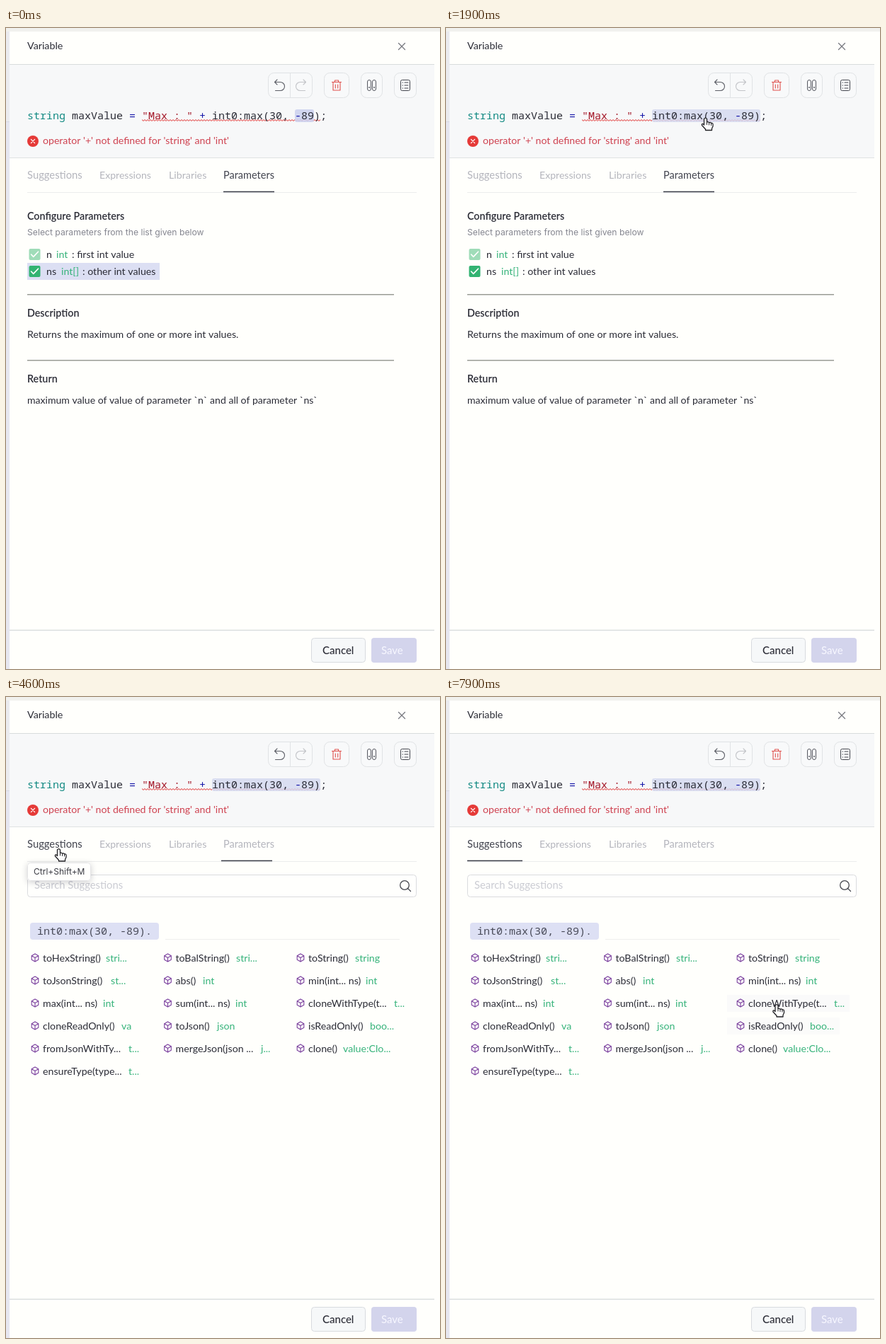
Animation, 613 px wide and 906 px high, one loop 8 s. Source, as an HTML page with a canvas:

```html
<!DOCTYPE html>
<html lang="en">
<head>
<meta charset="utf-8">
<title>Variable</title>
<style>
html, body { margin: 0; width: 100%; height: 100%; overflow: hidden; background: #fffffc; }
canvas { display: block; width: 613px; height: 906px; }
</style>
</head>
<body>
<canvas id="stage"></canvas>
<script>
const W = 613, H = 906, LOOP = 8000;
const stage = document.getElementById('stage');
const dpr = window.devicePixelRatio || 1;
stage.width = W * dpr;
stage.height = H * dpr;
const c = stage.getContext('2d');

const UI = 'Lato, "Open Sans", sans-serif';
const SMALL = 'Inter, sans-serif';
const MONO = '"Noto Sans Mono", "DejaVu Sans Mono", monospace';
const INK = '#2b2c36', GREEN = '#36b37a', GREY = '#b4b5bd', DARK = '#42444f';

function text(s, x, y, color = INK, size = 14.2, family = UI, weight = 400) {
  c.font = `${weight} ${size}px ${family}`;
  c.fillStyle = color;
  c.fillText(s, x, y);
}

function box(x, y, w, h, r, fill, line) {
  c.beginPath();
  c.roundRect(x, y, w, h, r);
  if (fill) { c.fillStyle = fill; c.fill(); }
  if (line) { c.strokeStyle = line; c.lineWidth = 1; c.stroke(); }
}

function rect(x, y, w, h, fill) {
  c.fillStyle = fill;
  c.fillRect(x, y, w, h);
}

// Strokes an SVG path around a local origin
function icon(x, y, d, color, width = 1.1, fill) {
  const p = new Path2D(d);
  c.save();
  c.translate(x, y);
  c.lineWidth = width;
  c.lineCap = c.lineJoin = 'round';
  if (fill) { c.fillStyle = fill; c.fill(p); }
  if (color) { c.strokeStyle = color; c.stroke(p); }
  c.restore();
}

const UNDO = 'M-3 -8L-6.5 -4.5L-3 -1M-6.5 -4.5H1.5A6 6 0 0 1 1.5 7.5H-5.5';
const REDO = 'M3 -8L6.5 -4.5L3 -1M6.5 -4.5H-1.5A6 6 0 0 0 -1.5 7.5H5.5';
const TRASH = 'M-6.5 -4.5H6.5M-2.5 -4.5V-7H2.5V-4.5M-5 -4.5V7H5V-4.5M-1.7 -1V4M1.7 -1V4';
const CUBE = 'M0 -5.6L4.8 -2.8V2.8L0 5.6L-4.8 2.8V-2.8ZM-4.8 -2.8L0 0L4.8 -2.8M0 0V5.6';
const ARROW = 'M0 0V16L3.8 12.6L6.4 18.6L9 17.4L6.5 11.7H11.6Z';
const HAND = 'M-2 1.5Q0 -1.2 2 1.5V6Q4 5 5 6.8Q7 5.8 8 7.5Q10.6 7 10.5 9.5V12L9 15V17.5H0V16L-5 10.5Q-5.6 8 -3.6 8.6L-2 10Z';

function drawFrame() {
  rect(0, 0, W, H, '#fffffc');
  rect(0, 0, W, 5, '#f1f1ee');
  rect(0, 5, 5, 127, '#ebebef');
  rect(0, 132, 5, H - 132, '#e6e6f0');
  rect(0, 132, 5, 1, '#d9d9e4');
  text('Variable', 30, 30, INK, 14.3);
  icon(559, 26, 'M-4.5 -4.5L4.5 4.5M4.5 -4.5L-4.5 4.5', '#77787f', 1.3);
  rect(5, 52, 600, 131, '#f7f8f9');
  rect(5, 51, 600, 1, '#d8dcdc');
  rect(5, 183, 600, 1, '#dfe2e3');

  for (const [x, w] of [[370.5, 62], [449.5, 35], [501.5, 30], [548.5, 31]]) {
    box(x, 63.5, w, 35, 8, '#f8f9fa', '#e0e3e5');
  }
  rect(401, 64, 1, 35, '#e0e3e5');
  icon(386, 81, UNDO, '#5c5e66');
  icon(417, 81, REDO, '#c2c4c8');
  icon(467, 81, TRASH, '#e0504c');
  for (const x of [510.5, 517.5]) {
    box(x, 73.5, 5, 15, 2.5, null, '#55575f');
    box(x + 1.5, 83, 2, 2, 1, '#55575f');
  }
  box(557.5, 73.5, 13, 15, 2, null, '#44464e');
  for (const y of [77, 81, 85]) {
    icon(564, y, 'M-4 0H-3.5M-1 0H4', '#44464e');
  }

  rect(5, 850.5, 600, 1.5, '#dcdfe0');
  box(431.5, 862.5, 76, 34, 4, '#f6f8f9', '#d8dbdf');
  text('Cancel', 447, 885, INK, 15, UI, 500);
  box(516, 862, 64, 35, 4, '#d3d4ec');
  text('Save', 530, 885, '#f7f7ff', 15);
}

const CODE = [
  ['string', 0, '#128a83'], ['maxValue', 7, INK], ['=', 16, '#1414a8'],
  ['"Max : "', 18, '#a31526'], ['+', 27, '#1414a8'], ['int0:max(30,', 29, INK],
  ['-', 42, '#1414a8'], ['89);', 43, INK]
];

function drawCode(hover, selected) {
  c.beginPath();
  for (let x = 192; x <= 444; x += 2) c.lineTo(x, 130.5 + (x % 4 ? 0.9 : -0.9));
  c.strokeStyle = '#e0302f';
  c.lineWidth = 1;
  c.stroke();
  if (selected) box(291, 115, 153, 18, 3, 'rgba(213,217,240,.84)');
  else {
    if (hover) box(291, 115, 153, 18, 3, '#e5e8ed');
    box(408, 115, 27, 18, 3, hover ? '#cdd1ee' : 'rgba(204,208,238,.88)');
  }
  for (const [s, col, color] of CODE) text(s, 30 + col * 9, 129, color, 15, MONO);

  box(30, 152, 16, 16, 8, '#e53a38');
  icon(38, 160, 'M-2.6 -2.6L2.6 2.6M2.6 -2.6L-2.6 2.6', '#fff', 1.3);
  text("operator '+' not defined for 'string' and 'int'", 52, 164, '#cf4250', 14.1);
}

const TABS = [['Suggestions', 30, 14.8], ['Expressions', 132, 14.1], ['Libraries', 230, 14.3], ['Parameters', 307, 14.5]];

function drawTabs(active, slide) {
  rect(30, 232, 550, 1, '#ecedec');
  TABS.forEach(([s, x, size], i) => text(s, x, 213, i === active ? DARK : GREY, size));
  rect(307 - 277 * slide, 230.7, 72 + 6 * slide, 1.5, '#3a3c48');
}

function check(y, color) {
  box(32.5, y, 16, 16, 2, color);
  icon(40.5, y + 8, 'M-5 0L-1.8 3.4L5 -3.8', '#fff', 1.6);
}

function section(title, y) {
  text(title, 30, y, INK, 14.3, UI, 600);
}

function drawParameters(marked) {
  section('Configure Parameters', 271);
  text('Select parameters from the list given below', 30, 293, '#858690', 12.2, SMALL);
  if (marked) rect(30, 332, 187, 24, '#dcdff3');
  check(312, '#9fdcb8');
  text('n', 57, 325);
  text('int', 71, 325, GREEN);
  text(': first int value', 93, 325);
  check(336, '#32b372');
  text('ns', 57, 349);
  text('int[]', 78, 349, GREEN);
  text(': other int values', 108, 349);
  rect(30, 376, 518, 1.5, '#999c96');
  section('Description', 408);
  text('Returns the maximum of one or more int values.', 30, 438);
  rect(30, 469, 518, 1.5, '#999c96');
  section('Return', 501);
  text('maximum value of value of parameter `n` and all of parameter `ns`', 30, 531, INK, 14.05);
}

// Columns: text x, then name, type and type x for each row
const COLUMNS = [
  [52, [['toHexString()', 'stri...', 141], ['toJsonString()', 'st...', 148], ['max(int... ns)', 'int', 137],
    ['cloneReadOnly()', 'va', 163], ['fromJsonWithTy...', 't...', 173], ['ensureType(type...', 't...', 173]]],
  [239.5, [['toBalString()', 'stri...', 325], ['abs()', 'int', 278], ['sum(int... ns)', 'int', 324],
    ['toJson()', 'json', 298], ['mergeJson(json ...', 'j...', 360]]],
  [427, [['toString()', 'string', 493], ['min(int... ns)', 'int', 508], ['cloneWithType(t...', 't...', 548],
    ['isReadOnly()', 'boo...', 514], ['clone()', 'value:Clo...', 476]]]
];

function drawSuggestions(hover) {
  box(30.5, 251.5, 549, 31, 4, '#fffffd', '#dadbde');
  text('Search Suggestions', 40, 271, '#cbccd3', 14.8);
  icon(563, 266, 'M6.3 0A6.3 6.3 0 1 1 -6.3 0A6.3 6.3 0 1 1 6.3 0M4.6 4.6L8.5 8.5', '#44464e', 1.3);
  box(34, 319, 182, 24, 4, '#dde0f4');
  text('int0:max(30, -89).', 44, 336, '#4a4c5a', 15, MONO);
  rect(225, 342, 331, 1, '#eeeeed');
  if (hover) {
    rect(397, 421, 173, 24, '#fafafa');
    rect(397, 453, 159, 24, '#fbfbfa');
  }
  for (const [x, rows] of COLUMNS) {
    rows.forEach(([name, type, tx], i) => {
      const y = 369 + 32 * i;
      icon(x - 11, y - 0.5, CUBE, '#7a3f9d');
      text(name, x, y + 5);
      text(type, tx, y + 5, GREEN);
    });
  }
}

function drawTooltip(alpha) {
  if (alpha <= 0) return;
  c.save();
  c.globalAlpha = alpha;
  c.shadowColor = 'rgba(40,42,60,.22)';
  c.shadowBlur = 9 * dpr;
  c.shadowOffsetY = 2 * dpr;
  box(30, 234, 90, 26, 4, '#fffffd');
  c.shadowColor = 'transparent';
  box(30.5, 234.5, 89, 25, 4, null, '#e4e4e6');
  text('Ctrl+Shift+M', 39, 251, '#3a3b43', 12, SMALL);
  c.restore();
}

// Moves: start time, then the pointer tip per 100 ms; 1 marks the hand
const MOVES = [
  [600, [349.5, 61.5]],
  [800, [351, 70], [354, 87], [359, 106], [364, 121, 1], [366.5, 127, 1]],
  [2600, [362, 132, 1], [346, 156], [313.5, 193.5], [205, 229], [108, 226, 1], [74.5, 214.5, 1]],
  [4700, [88, 230], [132, 305], [212, 440], [286, 585], [326, 666], [335.5, 688.5]],
  [7600, [372, 612], [446.5, 492, 1]],
  [7900, [467, 434.5, 1]]
];

function drawPointer(t) {
  let tip;
  for (const [start, ...tips] of MOVES) {
    if (t >= start) tip = tips[Math.min(Math.floor((t - start) / 100), tips.length - 1)];
  }
  if (!tip) return;
  const [x, y, hand] = tip;
  if (hand) {
    icon(x, y, HAND, '#202024', 1.3, '#fff');
    icon(x, y, 'M2 6V9.5M5 7V10M8 8V10.5', '#202024', 1);
  } else {
    icon(x, y, ARROW, '#fff', 2);
    icon(x, y, ARROW, null, 1, '#202024');
  }
}

function render(t) {
  t = Math.floor(t / 100) * 100;
  const listed = t >= 4600;
  const slide = listed ? [0.011, 0.65, 0.95, 1][Math.min((t - 4600) / 100, 3)] : 0;
  const tip = t < 4700 ? (t - 3200) / 300 : (4900 - t) / 300;
  c.setTransform(dpr, 0, 0, dpr, 0, 0);
  drawFrame();
  drawCode(t >= 1100, t >= 1900);
  drawTabs(listed ? 0 : 3, slide);
  if (listed) drawSuggestions(t >= 7900);
  else drawParameters(t < 1900);
  drawTooltip(Math.min(tip, 1));
  drawPointer(t);
}

function tick() {
  render(performance.now() % LOOP);
  requestAnimationFrame(tick);
}
tick();
</script>
</body>
</html>
```
